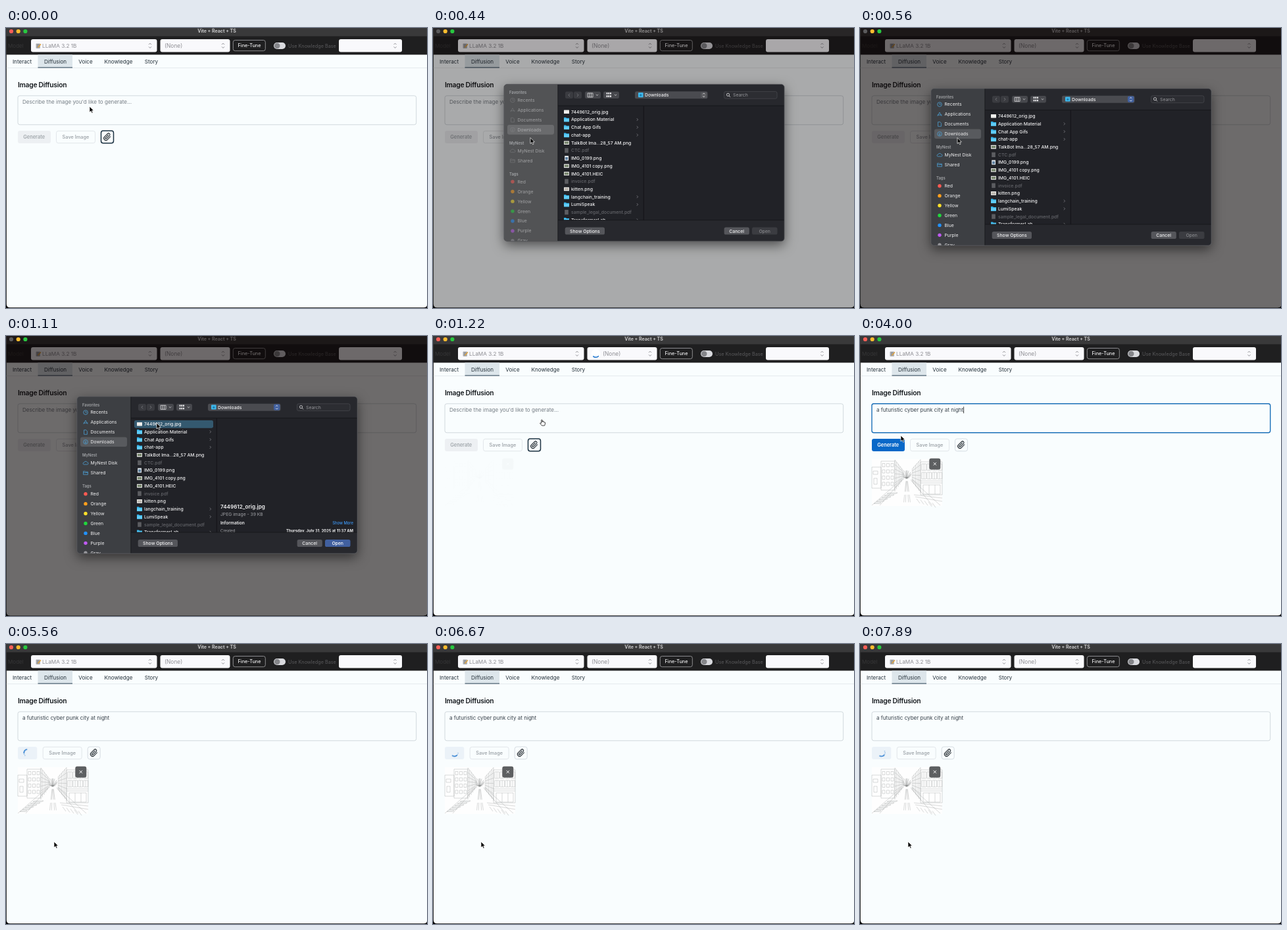
Write an HTML page that moves like this. It is 640 px wide and 425 px high and loops after 8 s.

```html
<!DOCTYPE html>
<html lang="en">
<head>
<meta charset="utf-8">
<title>Image Diffusion</title>
<style>
html, body { margin: 0; width: 100%; height: 100%; overflow: hidden; background: #000; }
svg { display: block; width: 640px; height: 425px; }
text { font-family: Inter, Roboto, sans-serif; white-space: pre; }
#sheet { --side: #3d3f43; --accent: #41609f; --icon: #4d9fd2; --dim: 1; --open: #fff; }
#sheet.idle { --side: #525355; --accent: #56575b; --icon: #8d8f91; --dim: .5; }
#sheet.blank { --open: #85868a; }
#shadow { filter: drop-shadow(0 6px 9px rgba(0, 0, 0, .55)); }
</style>
</head>
<body>
<svg id="stage" viewBox="0 0 640 425" xmlns="http://www.w3.org/2000/svg"></svg>
<script>
const LOOP = 8000, STEP = LOOP / 72;
const PROMPT = 'a futuristic cyber punk city at night';

// Markup helpers; text is placed by its vertical middle.
const text = (x, cy, s, size, fill, more = '') =>
  `<text x="${x}" y="${cy + size * 0.36}" font-size="${size}" fill="${fill}" ${more}>${s}</text>`;
const rect = (x, y, w, h, fill, r = 0, more = '') =>
  `<rect x="${x}" y="${y}" width="${w}" height="${h}" rx="${r}" fill="${fill}" ${more}/>`;
const dot = (x, y, r, fill, more = '') => `<circle cx="${x}" cy="${y}" r="${r}" fill="${fill}" ${more}/>`;
const line = (d, color, w = 1, more = '') =>
  `<path d="${d}" fill="none" stroke="${color}" stroke-width="${w}" ${more}/>`;
const group = (id, body, more = '') => `<g id="${id}" ${more}>${body}</g>`;
const MID = 'text-anchor="middle"', END = 'text-anchor="end"';
const weight = w => ` font-weight="${w}"`;
const stepper = (x, y, color, k = 1) =>
  line(`M${x - 2 * k} ${y - 1.6 * k}l${2 * k} ${-2 * k}l${2 * k} ${2 * k}M${x - 2 * k} ${y + 1.6 * k}l${2 * k} ${2 * k}l${2 * k} ${-2 * k}`, color, 0.8);

function arcs(id, r) {
  const c = r * Math.SQRT1_2, d = `M${c} ${c}A${r} ${r} 0 0 1 ${-c} ${c}`;
  return group(id + 'Ease', line(d, '#1670cc', 1.4)) +
    group(id + 'Even', line(d, '#1670cc', 1.2, 'stroke-dasharray="1.2 1.2" opacity=".6"'));
}

function header() {
  const select = (x, w) => rect(x, 17, w, 19.5, '#f9f9fc', 3) + stepper(x + w - 10.5, 26.8, '#77777c');
  const tabs = [[24.5, 'Interact'], [75, 'Diffusion'], [121, 'Voice'], [171, 'Knowledge'], [221, 'Story']]
    .map(([x, s]) => text(x, 50.7, s, 8.1, '#26323b', MID)).join('');
  return rect(0, 0, 640, 13, '#39393a') + rect(0, 12.5, 640, 28, '#1f1f20') +
    text(320.5, 4.3, 'Vite + React + TS', 7, '#c9c9ca', MID + weight(700)) +
    text(3, 27, 'Model', 8.1, '#363637') +
    select(38, 191.5) + rect(45.5, 23.5, 6.5, 7.5, '#aeb0b4', 1) +
    line('M46.8 25.5h3.8M46.8 27.3h3.8M46.8 29h2.5', '#6e7074', 0.6) + line('M48.5 29.5l4.5-5', '#e2a33a', 1.4) +
    text(55, 26.9, 'LLaMA 3.2 1B', 8.2, '#8e8e93') +
    select(234.5, 106) + `<text id="none" y="29.9" font-size="8.4" fill="#8e8e93">(None)</text>` +
    group('busy', dot(0, 0, 7, '#fff') + line('M4.3 3.2A5.4 5.4 0 0 1 -4.2 3.4', '#1670cc', 1.5), 'transform="translate(247.5 27)"') +
    rect(345.3, 18.5, 49, 16.2, '#1f1f20', 3, 'stroke="#a8a8aa" stroke-width=".8"') +
    text(370, 26.8, 'Fine-Tune', 7.3, '#eeeeef', MID + weight(500)) +
    rect(407, 22, 18, 10, '#d9dade', 5) + dot(412.2, 27, 4.3, '#85868a') +
    text(429, 27, 'Use Knowledge Base', 7.25, '#59595b') + select(506, 96) +
    rect(48.5, 40.5, 52.5, 19.8, '#dde6eb') + line('M0 60.6H640', '#dfe6e9', 0.8) +
    line('M48.5 60H101', '#2b4354', 1.2) + tabs;
}

// Street in one-point perspective.
function street() {
  const vx = 71, vy = 211;
  let d = '';
  const to = (x, y, k) => [x + (vx - x) * k, y + (vy - y) * k];
  const ray = (x, y, a, b) => d += `M${to(x, y, a)}L${to(x, y, b)}`;
  const post = (x, y1, y2, k) => d += `M${to(x, y1, k)}L${to(x, y2, k)}`;
  const box = (x, y, w, h) => d += `M${x} ${y}h${w}v${h}h${-w}z`;
  for (let i = 0; i < 7; i++) {
    ray(53, 188 + i * 7, 0, 0.72);
    ray(92, 187.5 + i * 8, 0, 0.6);
  }
  for (let k = 0; k < 0.8; k += 0.14) { post(53, 188, 236, k); post(92, 187.5, 238, k * 0.85); }
  box(32, 190, 21, 44); box(18, 199, 14, 32);
  for (let r = 0; r < 4; r++) for (let c = 0; c < 3; c++) box(34 + c * 6.5, 193.5 + r * 9.5, 4, 5);
  box(20, 205, 7, 5); box(21, 216, 5, 9);
  box(92, 191, 33, 50);
  for (let r = 0; r < 2; r++) for (let c = 0; c < 4; c++) { box(94 + c * 8, 194 + r * 13, 6.5, 10); d += `M${97.2 + c * 8} ${194 + r * 13}v10`; }
  d += 'M92 220H125M92 223H125M96 226h26v14h-26zM105 226v14M114 226v14M84 244L125 251M82 241L125 246';
  for (const x of [18, 30, 110, 122]) ray(x, 257, 0, 0.85);
  for (const x of [66, 69, 74, 77]) ray(x, 257, 0.1, 0.35), ray(x, 257, 0.45, 0.8);
  for (let i = 0; i < 6; i++) {
    const y = 238 + i * 3;
    d += `M${44 - i * 4} ${y}h${13 - i}l-3 1.4h${i - 13}z`;
  }
  for (let i = 0; i < 5; i++) d += `M${86 + i * 6} ${247 + i * 1.6}l5 7`;
  let tuft = '';
  for (let i = 0; i < 16; i++) tuft += `M71 216L${71 + 7 * Math.cos(i * 2.4)} ${210 + 6 * Math.sin(i * 2.4)}`;
  return rect(18, 187, 107, 71, '#fefefe') + line(d, '#9fa1a2', 0.4) + line(tuft, '#77797a', 0.4);
}

function page() {
  const clip = 'M21.44 11.05l-9.19 9.19a6 6 0 0 1-8.49-8.49l9.19-9.19a4 4 0 0 1 5.66 5.66l-9.2 9.19a2 2 0 0 1-2.83-2.83l8.49-8.48';
  return rect(0, 0, 640, 425, '#f9fdfe') + header() +
    text(18, 86.3, 'Image Diffusion', 10.3, '#15191d', weight(600) + ' letter-spacing="-.025em"') +
    `<rect id="field" x="18" y="102.8" width="605.7" height="44" rx="3" fill="#f9fdfe"/>` +
    group('hint', text(25, 112.3, "Describe the image you'd like to generate...", 8.1, '#777f86')) +
    `<text id="prompt" x="25" y="115.2" font-size="8.05" fill="#38414a"></text>` +
    rect(0, 107.3, 0.8, 10, '#111', 0, 'id="caret"') +
    rect(18, 156, 50, 19, '#edf0f3', 3, 'id="go"') +
    `<text id="goText" x="42.7" y="168" font-size="7.4" text-anchor="middle" font-weight="600">Generate</text>` +
    group('spin', arcs('spin', 5.4), 'transform="translate(32.6 165.2)"') +
    group('tools', rect(76.5, 156.3, 59, 18.4, '#f9fdfe', 3, 'stroke="#dfe4e8" stroke-width=".9"') +
      text(106, 165.4, 'Save Image', 7.3, '#a2a8ad', MID + weight(600)) +
      `<rect id="attach" x="144.5" y="156" width="19" height="18.8" rx="3.2" fill="#f9fdfe"/>` +
      line(clip, '#1a2127', 2, 'transform="translate(147.7 159) scale(.52)" stroke-linecap="round"')) +
    group('thumb', street() + rect(105.3, 185.7, 17, 17, '#5d5f61', 3) +
      line('M111.6 191.9l4.4 4.4m0-4.4l-4.4 4.4', '#fff', 0.9));
}

function sidebar() {
  const head = (y, s) => text(116, y, s, 5.9, '#a3a5a8', weight(600));
  const shapes = {
    clock: 'M3.3 0A3.3 3.3 0 1 1 -3.3 0A3.3 3.3 0 1 1 3.3 0M0-2V0H1.8',
    apps: 'M-3 2.6L0-3L3 2.6M-3.4 1H3.4',
    page: 'M-2.4-3.3H.8L2.4-1.6V3.3H-2.4z',
    down: 'M3.3 0A3.3 3.3 0 1 1 -3.3 0A3.3 3.3 0 1 1 3.3 0M0-1.8V1.8M-1.4.5L0 1.8L1.4.5',
    cloud: 'M-2.5 2.2H2.5A1.6 1.6 0 0 0 2.5-1A2.6 2.6 0 0 0 -2.3-.8A1.5 1.5 0 0 0 -2.5 2.2',
    folder: 'M-3.4-2.5H-.8L0-1.6H3.4V2.6H-3.4zM-3.4-.4H3.4'
  };
  const item = (y, s, icon) => text(128.5, y, s, 6.85, '#f1f1f2') +
    line(shapes[icon], 'var(--icon)', 0.8, `transform="translate(121 ${y})"`);
  const tags = ['Red #ff5a52', 'Orange #ff9f1c', 'Yellow #ffe02a', 'Green #20d83c', 'Blue #2292ff', 'Purple #bf5af2', 'Gray #98989d']
    .map((s, i) => {
      const [name, color] = s.split(' '), y = 239.7 + i * 14.93;
      return dot(121, y, 2.7, color) + text(128.5, y, name, 6.85, '#f1f1f2');
    }).join('');
  return rect(108, 92, 82, 238, 'var(--side)') + rect(113, 153.5, 71, 14.6, '#fff', 3, 'opacity=".14"') +
    head(104.5, 'Favorites') + head(181, 'MyNest') + head(228.3, 'Tags') +
    `<g style="opacity:var(--dim)">` + item(116, 'Recents', 'clock') + item(131, 'Applications', 'apps') +
    item(146, 'Documents', 'page') + item(160.8, 'Downloads', 'down') +
    item(192.8, 'MyNest Disk', 'cloud') + item(207.8, 'Shared', 'folder') + tags + '</g>' +
    line('M189.8 92V330', '#17181b', 0.8);
}

function fileList() {
  // d: folder, i: image, p: unavailable document
  const files = ['i7449612_orig.jpg', 'dApplication Material', 'dChat App Gifs', 'dchat-app', 'iTalkBot Ima...28_57 AM.png',
    'pCTC.pdf', 'iIMG_0199.png', 'iIMG_4101 copy.png', 'iIMG_4101.HEIC', 'pinvoice.pdf', 'ikitten.png',
    'dlangchain_training', 'dLumiSpeak', 'psample_legal_document.pdf', 'dTransformerLab'];
  return files.map((f, i) => {
    const kind = f[0], y = 133.7 + i * 11.72;
    const icon = kind == 'd'
      ? `<path d="M199 ${y - 3.3}h3l1 1h4v5.6h-8z" fill="#35b4ea"/>` + rect(199, y - 1.2, 8, 4.4, '#62cdf6', 0.6)
      : kind == 'p' ? rect(200.2, y - 3.6, 5.6, 7.2, '#5c5d61', 0.5)
      : f.includes('0199') ? rect(200.2, y - 3.6, 5.8, 7.2, '#e8edf2', 0.4) + rect(201.2, y - 1.6, 3.8, 4, '#5c7f9e')
      : rect(199, y - 2.8, 8, 5.6, '#eeeeec', 0.4) + (i ? rect(199.8, y - 1.6, 6.4, 3.2, i == 10 ? '#b9b4ac' : '#718067') : '');
    return icon + text(210, y, f.slice(1), 6.85, kind == 'p' ? '#65666b' : '#f4f4f5', weight(500)) +
      (kind == 'd' ? line(`M309.8 ${y - 1.9}l1.8 1.9l-1.8 1.9`, '#808187', 0.8) : '');
  }).join('');
}

function sheet() {
  const button = (x, w, s, fill, ink) => rect(x, 309, w, 11, fill, 2.6) + text(x + w / 2, 314.5, s, 6.85, ink, MID + weight(500));
  const chev = x => line(`M${x - 1.6} 107.3l1.6 1.6l1.6-1.6`, '#d4d4d6', 0.9);
  const bars = rect(190, 92, 344, 32, '#27282d') + rect(190, 298, 344, 32, '#27282d');
  const tools = rect(201, 103, 12, 10.5, '#3a3b40', 2.4) + rect(214, 103, 12, 10.5, '#3a3b40', 2.4) +
    line('M208 106l-2 2.2l2 2.2M219 106l2 2.2l-2 2.2', '#77787c', 0.9) +
    rect(231, 103, 24, 10.5, '#47484d', 2.4) + rect(259, 103, 24, 10.5, '#47484d', 2.4) +
    line('M235 105.3h8v6h-8zM237.7 105.3v6M240.4 105.3v6', '#e3e3e5', 0.8) + chev(249.5) +
    line('M263.5 105.7h7.5M263.5 110h7.5', '#e3e3e5', 2.6, 'stroke-dasharray="2 .75"') + chev(277.5) +
    rect(307, 102.7, 110.5, 11, '#4a4b50', 2.6) + rect(312, 104.4, 7.6, 7.2, '#3eb8ec', 1) + dot(315.8, 108.3, 1.6, '#1c7fb0') +
    text(322, 108.2, 'Downloads', 6.85, '#f2f2f3', weight(500)) +
    rect(407, 103.6, 9.4, 9.2, 'var(--accent)', 2) + stepper(411.7, 108.2, '#fff', 0.8) +
    rect(442.4, 102.8, 80.6, 10.8, '#2c2d32', 2.6, 'stroke="#46474c" stroke-width=".8"') +
    line('M450.6 107.7A2.1 2.1 0 1 1 446.4 107.7A2.1 2.1 0 1 1 450.6 107.7M450 109.3l2 2', '#d7d7d9', 0.9) +
    text(456, 108.2, 'Search', 6.85, '#98999d');
  const info = text(326, 259.2, '7449612_orig.jpg', 8.1, '#f2f2f3', weight(600)) +
    text(326, 270.8, 'JPEG image - 39 KB', 6.75, '#a1a2a6') +
    text(326, 283.2, 'Information', 6.6, '#f2f2f3', weight(600)) +
    text(528, 283.5, 'Show More', 5.9, '#3d97f5', END + weight(500)) +
    text(326, 295.8, 'Created', 6, '#a1a2a6') +
    text(528, 295.8, 'Thursday, July 31, 2025 at 11:37 AM', 5.85, '#f2f2f3', END + weight(700));
  return rect(108, 92, 426, 238, '#212227', 5, 'id="shadow"') +
    `<g clip-path="url(#sheetClip)">` + rect(108, 92, 426, 238, '#212227') + bars + sidebar() +
    `<g clip-path="url(#listClip)">` + group('pick', rect(195, 128, 120, 11.7, '#34596f', 2.4) + info) + fileList() + '</g>' +
    line('M190 124.5H534M190 298H534', '#151619', 0.8) + line('M320.3 125V298', '#131417', 0.9) + tools +
    button(200.7, 60.3, 'Show Options', '#55565b', '#f4f4f5') + button(442.6, 38.2, 'Cancel', '#55565b', '#f4f4f5') +
    rect(485, 309, 38.5, 11, '#3b3c41', 2.6, 'id="openBack"') +
    text(504.2, 314.5, 'Open', 6.85, 'var(--open)', MID + weight(500)) + '</g>' +
    rect(107.8, 91.8, 426.4, 238.4, 'none', 5, 'stroke="#5f6064" stroke-width=".8"');
}

const lights = ['#ff5f57', '#febc2e', '#28c840'].map((c, i) => dot(8 + i * 10.7, 5, 3.1, c, `id="light${i}"`)).join('');

const pointers =
  group('arrow', `<path d="M0 0V9L2.1 7.1L3.6 10.3L5.1 9.6L3.7 6.5H6.4Z" fill="#000" stroke="#fff" stroke-width=".7"/>`) +
  group('hand', `<path d="M-1.3 5V.6Q-.6-.6 .1.6V3.4Q1-.2 1.7 3.5Q2.6 2.6 3.2 4Q4.4 3.2 4.5 5Q4.5 7.2 3.6 9H-.5Q-1.6 7.6-3.4 5.6Q-3.3 4.2-1.3 5.4Z" fill="#fff" stroke="#111" stroke-width=".8"/>`) +
  group('beam', line('M-1.5-4.5Q0-4.5 0-3.5V3.5Q0 4.5-1.5 4.5M1.5-4.5Q0-4.5 0-3.5M0 3.5Q0 4.5 1.5 4.5', '#222', 0.8));

const stage = document.getElementById('stage');
stage.innerHTML = `<defs>
  <clipPath id="win"><path d="M.8 0H640V420Q640 424.3 635 424.3H6Q.8 424.3 .8 419Z"/></clipPath>
  <clipPath id="sheetClip"><rect x="108" y="92" width="426" height="238" rx="5"/></clipPath>
  <clipPath id="listClip"><rect x="190" y="125" width="344" height="173"/></clipPath></defs>` +
  `<g clip-path="url(#win)">` + page() + rect(0, 0, 640, 425, '#080000', 0, 'id="shade"') + lights + '</g>' +
  group('sheet', sheet()) + group('pointer', pointers);

const $ = id => document.getElementById(id);
const set = (id, attrs) => { for (const k in attrs) $(id).setAttribute(k, attrs[k]); };
const show = (id, on) => { $(id).style.display = on ? '' : 'none'; };

const turn = [{ transform: 'rotate(0deg)' }, { transform: 'rotate(360deg)' }];
const spins = [['spinEase', 'ease'], ['spinEven', 'linear']].map(([id, easing]) => {
  const a = $(id).animate(turn, { duration: 420, iterations: Infinity, easing });
  a.pause();
  return a;
});

// step, x, y, pointer shape (empty: hidden)
const moves = [
  [0, 127, 119, 'arrow'], [1, 140, 138, 'arrow'], [2, 153, 162, 'hand'], [4, 148, 166.5, 'arrow'],
  [6, 172, 156, 'arrow'], [7, 205, 142, 'arrow'], [8, 227, 134, 'arrow'], [9, 229, 132, 'arrow'],
  [11, 166, 127, 'hand'], [12, 125, 122, 'beam'], [13, 100, 118, 'beam'], [15, 0, 0, ''],
  [35, 90, 130, 'beam'], [36, 62, 151, 'arrow'], [37, 45, 162, 'hand'], [39, 52, 200, 'arrow'],
  [40, 64, 250, 'arrow'], [41, 72, 290, 'arrow'], [42, 73, 300, 'arrow']
];

function typed(n) {
  if (n < 16) return '';
  if (n < 23) return PROMPT.slice(0, 1 + Math.round((n - 16) * 15 / 7));
  if (n == 23) return 'a futuristic cyp';
  if (n < 33) return PROMPT.slice(0, 17 + (n - 24) * 2);
  return PROMPT;
}

function draw(time) {
  const n = Math.min(71, Math.floor((time + 5) / STEP));
  const open = n >= 4 && n < 11, idle = n == 4, picked = n >= 9;
  const focus = n >= 13 && n < 38, loading = n >= 38, str = typed(n), ready = str && !loading;

  show('sheet', open);
  show('shade', open);
  set('shade', { opacity: idle ? 0.33 : 0.575 });
  set('light0', { fill: open ? '#5a5a5c' : '#ff5f57' });
  set('sheet', { transform: `translate(0 ${idle ? -6.4 : 0})`, class: (idle ? 'idle ' : '') + (picked ? '' : 'blank') });
  show('pick', picked);
  set('openBack', { fill: picked ? '#41609f' : '#3b3c41' });

  show('busy', n == 11);
  set('none', { x: n == 11 ? 258 : 241 });
  show('thumb', n >= 11);
  set('thumb', { opacity: n == 11 ? 0.03 : 1 });

  show('hint', !str);
  $('prompt').textContent = str;
  show('caret', focus);
  set('caret', { x: 25 + (str ? $('prompt').getComputedTextLength() : 0) });
  set('field', { stroke: focus ? '#1a6fb8' : '#cdd5da', 'stroke-width': focus ? 1.4 : 0.9 });
  set('attach', n < 13 ? { stroke: '#1d3343', 'stroke-width': 1.5 } : { stroke: '#d3dae0', 'stroke-width': 0.9 });

  set('go', { width: loading ? 29.3 : 50, fill: ready ? '#0968c8' : loading ? '#ebf2f8' : '#edf0f3' });
  set('goText', { fill: ready ? '#fff' : '#a2a8ad' });
  show('goText', !loading);
  show('spin', loading);
  set('tools', { transform: `translate(${loading ? -20.3 : 0} 0)` });
  spins.forEach(a => { a.currentTime = n * STEP; });

  const [, x, y, shape] = moves.filter(m => m[0] <= n).pop();
  for (const id of ['arrow', 'hand', 'beam']) show(id, id == shape);
  set('pointer', { transform: `translate(${x} ${y})` });
}

const start = performance.now();
function tick() {
  draw((performance.now() - start) % LOOP);
  requestAnimationFrame(tick);
}
tick();
</script>
</body>
</html>
```
